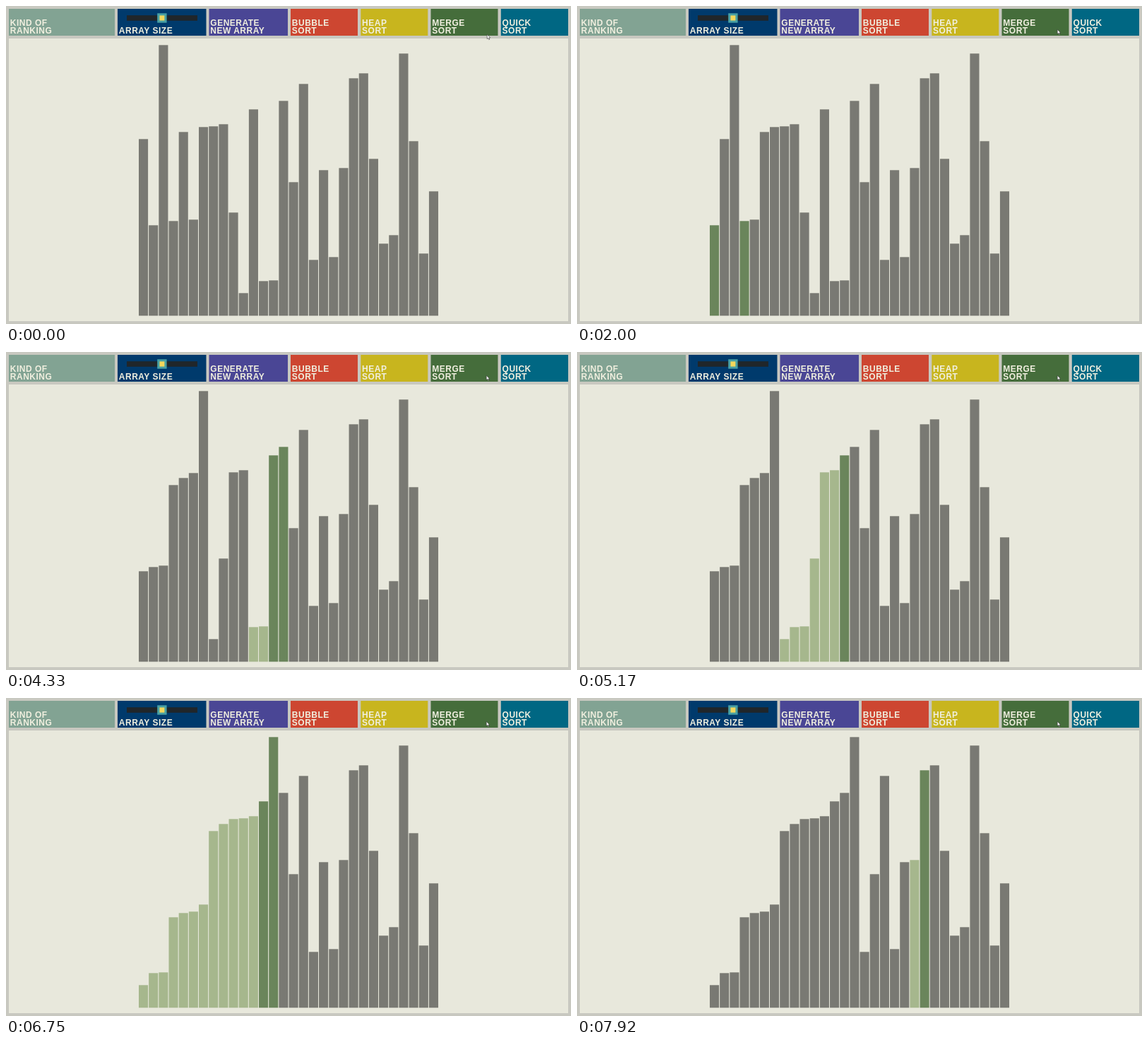
An HTML page that plays this animation: 800x450 px, repeating every 8000 ms.

```html
<!DOCTYPE html>
<html lang="en">
<head>
<meta charset="utf-8">
<title>Merge sort</title>
<style>
  html, body { margin: 0; width: 100%; height: 100%; overflow: hidden; background: #c8c8c0; }
  svg { display: block; width: 100vw; height: 100vh; }
  text { font: bold 12px "Liberation Sans", Arial, sans-serif; letter-spacing: .5px; fill: #f0efdf; }
</style>
</head>
<body>
<svg id="stage" viewBox="0 0 800 450"></svg>
<script>
const LOOP = 8000;
const START = 546;   // sorting begins
const STEP = 109.6;  // time to place one bar
const GREY = '#797973', ACTIVE = '#6a855b', PLACED = '#a6b78d';
const FLOOR = 438.3, LEFT = 188, PITCH = 14.17;

const tops = [188, 310, 55, 304, 178, 302, 171, 170, 167, 292, 406, 146, 389, 388, 134,
  249, 110, 359, 232, 355, 229, 102, 95, 216, 336, 324, 67, 191, 350, 262];

const buttons = [
  [4, 150, '#82a393', 'KIND OF', 'RANKING'],
  [158, 125.5, '#003a6c', '', 'ARRAY SIZE'],
  [287.5, 111.5, '#4a4695', 'GENERATE', 'NEW ARRAY'],
  [403, 95, '#cd4631', 'BUBBLE', 'SORT'],
  [502.3, 95, '#c8b51e', 'HEAP', 'SORT'],
  [601.5, 95, '#456d3b', 'MERGE', 'SORT'],
  [700.8, 95.2, '#006783', 'QUICK', 'SORT']
];

const stage = document.getElementById('stage');

function add(tag, attrs, text) {
  const el = document.createElementNS(stage.namespaceURI, tag);
  for (const key in attrs) el.setAttribute(key, attrs[key]);
  if (text) el.textContent = text;
  return stage.appendChild(el);
}

function box(x, y, width, height, fill) {
  return add('rect', { x, y, width, height, fill });
}

// Run the sort once, keeping two snapshots per placed bar: compared, then moved.
function record() {
  const order = tops.map((_, i) => i);
  const shots = [];
  const snap = (active, placed) =>
    shots.push({ order: order.slice(), active, placed: placed.slice() });

  function merge(lo, mid, hi) {
    const placed = [];
    let j = mid;
    for (let k = lo; k < hi; k++) {
      j = Math.max(j, k);
      const active = [];
      if (k < j) active.push(order[k]);
      if (j < hi) active.push(order[j]);
      snap(active, placed);
      if (active.length === 2 && tops[active[1]] > tops[active[0]]) {
        order.splice(k, 0, order.splice(j, 1)[0]);
        j++;
      }
      snap(active, placed);
      placed.push(order[k]);
    }
  }

  function sort(lo, hi) {
    if (hi - lo < 2) return;
    const mid = lo + Math.floor((hi - lo) / 2);
    sort(lo, mid);
    sort(mid, hi);
    merge(lo, mid, hi);
  }

  sort(0, order.length);
  return shots;
}

const shots = record();
const idle = { order: tops.map((_, i) => i), active: [], placed: [] };

box(0, 0, 800, 450, '#c8c8c0');
box(4, 46, 792, 400, '#e8e8dc');
for (const [x, width, fill, first, second] of buttons) {
  box(x, 4, width, 38, fill);
  if (first) add('text', { x: x + 1.8, y: 28.3 }, first);
  add('text', { x: x + 1.8, y: 39.4 }, second);
}

// Size slider
box(171, 13.2, 100, 7.6, '#20262a');
box(214.2, 10.3, 13.4, 13.4, '#48a0a4');
box(217.4, 13.4, 7, 7.2, '#f2d75c');

const bars = tops.map((_, i) => box(LEFT + i * PITCH, 0, 13.1, 0, GREY));
const cursor = add('path', {
  d: 'M0 0V6.3L1.5 5L2.6 7.4L3.6 6.9L2.6 4.6H4.5Z',
  fill: '#fff', stroke: '#333', 'stroke-width': .6
});

function render(t) {
  const n = Math.floor((t - START) / STEP * 2);
  const shot = n < 0 ? idle : shots[Math.min(n, shots.length - 1)];
  shot.order.forEach((id, i) => {
    const bar = bars[i];
    bar.setAttribute('y', tops[id] + .3);
    bar.setAttribute('height', FLOOR - tops[id] - .3);
    bar.setAttribute('fill', shot.active.includes(id) ? ACTIVE
      : shot.placed.includes(id) ? PLACED : GREY);
  });

  const p = Math.min(1, Math.max(0, (t - 80) / 260));
  const ease = p * p * (3 - 2 * p);
  cursor.setAttribute('transform', `translate(${681.2 - ease} ${40.3 - 7 * ease})`);
}

const begin = performance.now();
function tick() {
  render((performance.now() - begin) % LOOP);
  requestAnimationFrame(tick);
}
tick();
</script>
</body>
</html>
```
